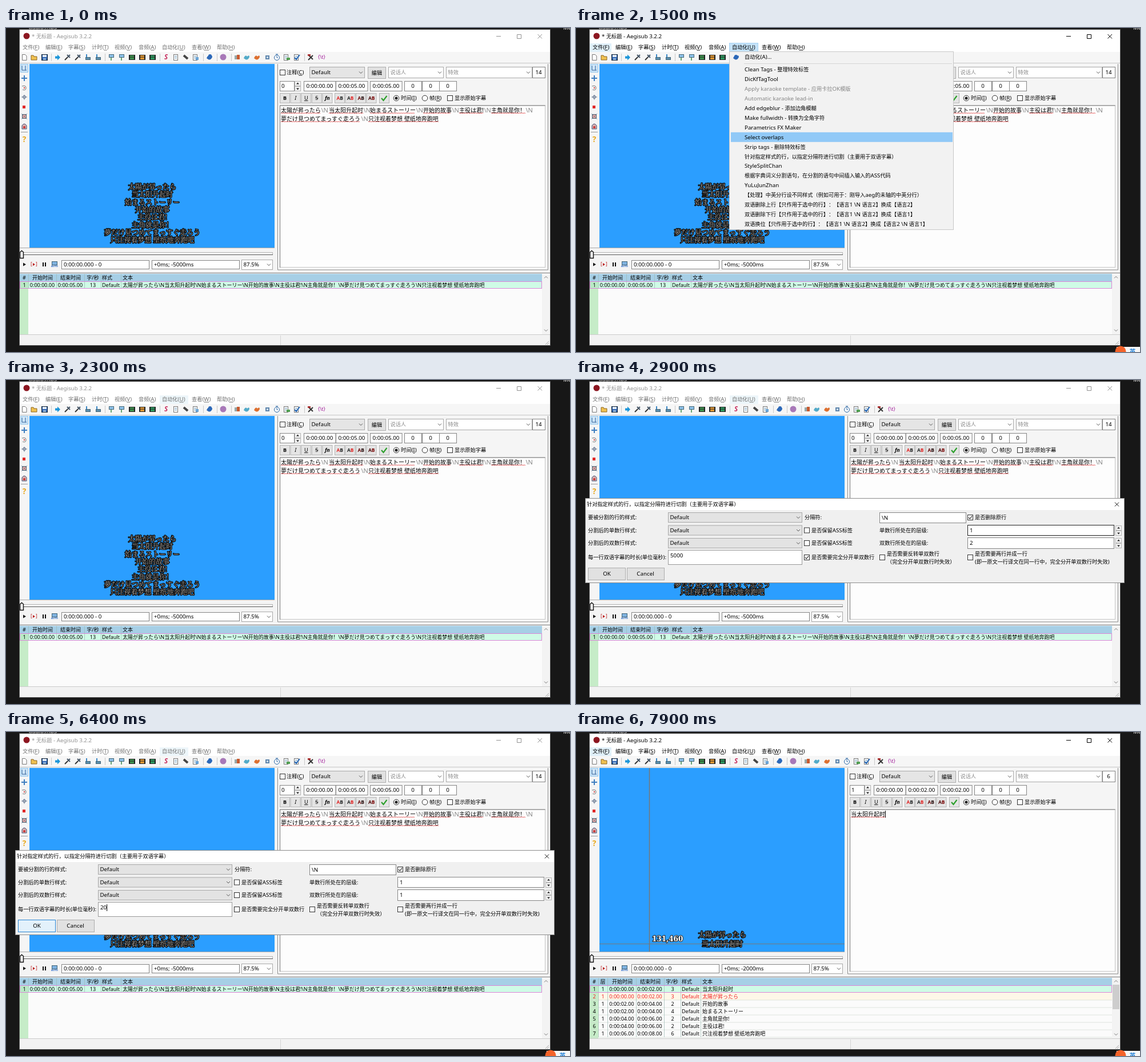
These frames come from a looping animation (987 by 568 pixels, 8 s). An HTML page:

```html
<!DOCTYPE html>
<html lang="zh-CN">
<head>
<meta charset="utf-8">
<style>
html, body { margin: 0; width: 100%; height: 100%; overflow: hidden; background: #171717; }
svg { display: block; width: 987px; height: 568px; }
text { white-space: pre; text-spacing-trim: space-all;
  font-family: "Noto Sans", "Noto Sans CJK SC", "Noto Sans CJK", sans-serif; }
.sub text { font-family: "Noto Serif CJK SC", "Noto Sans CJK SC", "Noto Sans CJK", serif;
  fill: #b9b4ae; stroke: #080808; stroke-width: 2.6px; paint-order: stroke; stroke-linejoin: round; }
.title { color: #929292; }
.bar { color: #707070; }
.active .title, .active .bar { color: #000; }
</style>
</head>
<body>
<svg id="stage" viewBox="0 0 987 568"></svg>
<script>
const CHANGE = 7600;
const stage = document.getElementById('stage');

// Drawing helpers; all return SVG markup.
const R = (x, y, w, h, fill = '#fff', stroke = 'none') => {
  const o = stroke === 'none' ? 0 : .5;
  return `<rect x="${x + o}" y="${y + o}" width="${w - 2 * o}" height="${h - 2 * o}" fill="${fill}" stroke="${stroke}"/>`;
};
const P = (d, stroke = '#333', w = 1, fill = 'none') =>
  `<path d="${d}" stroke="${stroke}" stroke-width="${w}" fill="${fill}"/>`;
const C = (x, y, r, fill, stroke = 'none') =>
  `<circle cx="${x}" cy="${y}" r="${r}" fill="${fill}" stroke="${stroke}"/>`;
// cy is the optical centre of the line; "&" underlines the next letter.
const T = (x, cy, str, { s = 9.2, f = '#000', a = 'start', k = 1.06, extra = '' } = {}) => {
  const body = str.replace(/&(\w)|[ -%'-~]+/g, (m, u) =>
    `<tspan font-size="${s * k}"${u ? ' text-decoration="underline"' : ''}>${u || m}</tspan>`);
  return `<text x="${x}" y="${cy + s * .37}" font-size="${s}" fill="${f}" text-anchor="${a}" ${extra}>${body}</text>`;
};
const mid = (x, cy, str, opt = {}) => T(x, cy, str, { a: 'middle', ...opt });
const G = (body, attrs = '') => `<g ${attrs}>${body}</g>`;
const during = (spans, body) => G(body, `data-t="${spans}"`);
const before = body => during(`0-${CHANGE}`, body);
const after = body => during(`${CHANGE}-8000`, body);
const each = (list, fn) => list.map(fn).join('');

const chevron = (x, y) => P(`M${x - 3} ${y - 1.5}l3 3l3-3`, '#555');
const combo = (x, y, w, str, { h = 20, bg = '#e5e5e5', f } = {}) =>
  R(x, y, w, h, bg, '#a8a8a8') + T(x + 3.5, y + h / 2, str, { f }) + chevron(x + w - 7, y + h / 2);
const field = (x, y, w, h, str = '') => R(x, y, w, h, '#fff', '#858585') + T(x + 4, y + h / 2, str);
const check = (x, cy, on, color = '#333') =>
  R(x, cy - 5, 10, 10, '#fff', color) + (on ? P(`M${x + 2} ${cy}l2.2 2.4l4-5`, color, 1.2) : '');
const spin = (x, y, h) => each([0, 1], i => {
  const top = y + i * h / 2, c = top + h / 4;
  return R(x, top, 11, h / 2, '#f4f4f4', '#b5b5b5') +
    P(i ? `M${x + 3} ${c - 1}h5l-2.5 3z` : `M${x + 3} ${c + 1}h5l-2.5-3z`, 'none', 0, '#222');
});
const squiggle = (x1, x2, y) => P(`M${x1} ${y}` + 'l1.5-1.5l1.5 1.5'.repeat((x2 - x1) / 3), '#e03030', .8);
const caret = (x, y, h = 12) => R(x, y, 1, h, '#000');

function titleBar() {
  const items = [[29, '文件(&F)'], [69, '编辑(&E)'], [109, '字幕(&S)'], [150, '计时(&T)'], [190, '视频(&V)'],
    [232, '音频(&A)'], [273, '自动化(&U)'], [325, '查看(&W)'], [369, '帮助(&H)']];
  return R(23, 2, 929, 40) +
    C(36, 14, 5.5, '#8c1620') +
    G(T(45, 14.5, '* 无标题 - Aegisub 3.2.2', { f: 'currentColor' }) +
      P('M858 14.5h8M894.5 11.5h7v7h-7zM930.5 11l7.5 7.5M938 11l-7.5 7.5', 'currentColor'), 'class="title"') +
    during('500-2200 7700-8000', R(24, 27, 38, 15, '#e0f0fa')) +
    during('800-900', R(146, 27, 40, 15, '#d4eafb')) +
    during('900-1000', R(228, 27, 40, 15, '#d4eafb')) +
    during('1000-1900', R(268, 26, 51, 16, '#c5e3f9', '#a4d1f3')) +
    during(`1900-${CHANGE}`, R(269, 27, 50, 15, '#edf6fa')) +
    G(each(items, ([x, s]) => T(x, 34, s, { f: 'currentColor' })), 'class="bar"');
}

function toolbar() {
  const y = 51;
  const lens = x => P(`M${x - 5} ${y + 5}l5-5`, '#333', 2) + P(`M${x - 1} ${y - 4}l5 5M${x} ${y}l4-4`, '#456', 2);
  const disk = x => R(x - 4, y, 9, 5, '#5b8fae', '#467') + P(`M${x - 2} ${y - 5}v5`, '#3a87c8', 2);
  const flag = x => R(x - 4, y - 5, 9, 6, '#8cc0e8', '#467') + P(`M${x} ${y + 1}v5`, '#3a8a4a', 1.5);
  const film = (x, c) => R(x - 5, y - 4, 11, 9, '#222') + R(x - 3, y - 3, 7, 7, c) + P(`M${x - 5} ${y}h11`, '#222');
  const page = x => R(x - 4, y - 5, 8, 11, '#fff', '#777') + P(`M${x - 2} ${y - 1.5}h4M${x - 2} ${y + 1.5}h4`, '#69b');
  const blob = (x, c) => P(`M${x - 5} ${y + 2}q3-7 6-3q4-4 4 1q-3 6-7 4z`, 'none', 0, c);
  return R(23, 42, 929, 21, '#f6f6f6') + P('M23 61.5h929', '#c4c4c4') +
    P('M28.5 46.5h5l2.5 2.5v7.5h-7.5z', '#777', 1, '#fff') +
    P('M44 56v-8h4l1 2h5v6z', '#8a6420', 1, '#f0c050') +
    R(62, 46, 11, 11, '#2d62b0', '#123') + R(64, 47, 7, 4, '#dfe9f5') + R(65, 53, 5, 3, '#9bd') +
    P('M86 49.5h4v-3l5 5l-5 5v-3h-4z', 'none', 0, '#1d96d8') +
    lens(108) + lens(126) + disk(143) + disk(161) + flag(184) + flag(202) +
    film(220, '#3f9650') + film(238, '#e69a35') + film(256, '#2c9a60') +
    mid(280, y, 'S', { s: 11, f: '#c83060', extra: 'font-weight="700" font-style="italic"' }) +
    page(297) + P('M311 48l7 6', '#444', 4) + page(331) + R(332, 51, 5, 5, '#6ba5d8') +
    blob(356, '#2c68b8') + C(357, 49, 3, '#2c68b8') + C(380, 51, 5.5, '#a878b8') +
    R(400, 48, 4, 7, '#9aa') + R(404, 47, 5, 8, '#c85a30') +
    blob(421, '#52aac8') + blob(439, '#dd7030') + R(454, 48, 7, 7, '#6288ae') + R(456, 50, 3, 3, '#cde') +
    C(474, 52, 4.5, '#fff', '#2360a0') + P('M474 52v-3M474 52h2M472 46h4', '#2360a0') +
    page(490) + R(491, 52, 6, 4, '#50a050') + page(508) + P('M505 52l3 3l6-8', '#2768b8', 2) +
    P('M529 56l8-8M530 48l7 7', '#333', 2) + R(528, 46, 5, 3, '#a33') +
    T(546, y, '{\\t}', { s: 8, f: '#a01898' }) +
    each([79, 173, 269, 345, 369, 394, 522], x => P(`M${x}.5 45v13`, '#c8c8c8'));
}

function sideTools() {
  return R(24, 63, 17, 322, '#f5f5f5') + R(25, 63, 14, 15, '#cfe6f8', '#8fc4ea') +
    P('M28 66v8h8M34 66v8', '#2a5d96') +
    P('M27 88h10M32 83v10', '#3d7dc0', 2) +
    P('M28 102q7-2 7 3t-6 3', '#888', 1.2) + R(31, 104, 2, 2, '#c33') +
    P('M27 121h10M32 117v9', '#789') + C(32, 121, 2.5, 'none', '#568') +
    R(29, 136, 5, 5, '#e02828') +
    R(28, 151, 8, 8, '#e8a8a0', '#467') + P('M27 150l10 10M37 150l-10 10', '#568', .6) +
    P('M28 177v-6q4-6 8 0v6z', '#457', 1, '#d8b0b0') + C(32, 174, 2, '#c33') +
    P('M26 182.5h12', '#999') +
    mid(32, 195, '?', { s: 13, f: '#e9a81c', extra: 'font-weight="700"' });
}

function video() {
  const lines = ['太陽が昇ったら', '当太阳升起时', '始まるストーリー', '开始的故事', '主役は君!', '主角就是你！',
    '夢だけ見つめてまっすぐ走ろう', '只注视着梦想 壁纸地奔跑吧'];
  const sub = (s, y) => mid(256, y, s, { s: 12, k: 1 });
  return R(41, 63, 429, 322, '#2b9eff') +
    before(G(each(lines, (s, i) => sub(s, 278.5 + i * 13.35)), 'class="sub"')) +
    after(G(sub(lines[0], 355.5) + sub(lines[1], 371.5), 'class="sub"')) +
    during('7700-8000', P('M128.5 63v322', '#777', 1.5) + P('M41 371.5h429', '#777', 1) +
      `<text x="133" y="367" font-size="12" fill="#fff" stroke="#222" stroke-width="2" paint-order="stroke"
        style="font-family:'DejaVu Serif',serif;font-weight:700">131,460</text>`) +
    P('M24 385.5h446', '#aaa') + R(30, 393, 437, 5, '#fafafa', '#b4b4b4') + P('M30 397.5h437', '#555') +
    P('M24.5 393l3-2.5l3 2.5v10.5h-6z', '#111', 1.4, '#eee') +
    P('M30 411.5v6l5-3z', 'none', 0, '#111') +
    T(43, 414.5, '[', { s: 8, f: '#b22' }) + P('M47 412v5l4-2.5z', 'none', 0, '#b22') + T(52, 414.5, ']', { s: 8, f: '#b22' }) +
    R(64, 411, 2, 7, '#111') + R(68, 411, 2, 7, '#111') +
    R(80, 409, 10, 7, '#7fb2e0', '#467') + mid(85, 418, 'AUTO', { s: 4, f: '#1c5fc0', extra: 'font-weight="700"' }) +
    field(97, 407, 154, 16, '0:00:00.000 - 0') + field(255, 407, 154, 16) +
    before(T(259, 415, '+0ms; -5000ms')) + after(T(259, 415, '+0ms; -2000ms')) +
    combo(412, 406, 55, '87.5%', { h: 18, bg: '#fff' });
}

function editor() {
  const times = end => each([[521, '0:00:00.00'], [577, end], [637, end]], ([x, s]) => field(x, 93, 56.5, 18) + mid(x + 28, 102, s));
  const style = ['font-weight="800"', 'font-style="italic"', 'text-decoration="underline"', 'text-decoration="line-through"',
    'font-weight="800" font-style="italic"'];
  const colors = [['#e02020', '#222'], ['#222', '#e02020'], ['#600', '#200'], ['#400', '#700']];
  const button = (x, w = 18) => R(x, 114, w, 18, '#e4e4e4', '#b4b4b4');
  const words = [[481, '太陽が昇ったら', 551], [565, '当太阳升起时', 625], [637, '始まるストーリー', 717], [730, '开始的故事', 780],
    [793, '主役は君!', 836], [849, '主角就是你！', 909]];
  const edit = { s: 10, k: 1.1 }, gray = { ...edit, f: '#888' };
  const word = ([x, s, end], y) => T(x, y, s, edit) + squiggle(x, end, y + 6);
  return R(475, 63, 477, 366, '#f5f5f5') + P('M475.5 63v361h473v-361', '#8a8a8a') + P('M477 63v359h470', '#fff') +
    check(479, 78, false) + T(491, 78, '注释(&C)') +
    combo(531, 68, 97, 'Default') + R(633, 68, 32, 21, '#e1e1e1', '#adadad') + mid(649, 78.5, '编辑') +
    combo(669, 68, 97, '说话人', { bg: '#fff', f: '#888' }) + combo(770, 68, 151, '特效', { bg: '#fff', f: '#888' }) +
    R(921, 68, 23, 20, '#fff', '#858585') + before(mid(932, 78, '14')) + after(mid(932, 78, '6')) +
    field(479, 93, 26, 18) + spin(505, 93, 18) +
    before(T(482, 102, '0') + times('0:00:05.00')) + after(T(482, 102, '1') + times('0:00:02.00')) +
    each([697, 728, 758], x => field(x, 93, 31, 18) + mid(x + 15, 102, '0')) +
    each(['B', 'I', 'U', 'S', 'fn'], (s, i) => button(479 + i * 18.6) + mid(488 + i * 18.6, 123, s, { s: 8.5, extra: style[i] })) +
    each(colors, ([a, b], i) => button(575 + i * 18.5) +
      mid(581.5 + i * 18.5, 123, 'A', { s: 8, f: a, extra: 'font-weight="800"' }) +
      mid(587 + i * 18.5, 123, 'B', { s: 8, f: b, extra: 'font-weight="800"' })) +
    button(653) + P('M657 123l3.5 4l6-8', '#2da02d', 2.2) +
    C(683, 123, 4.8, '#fff', '#333') + C(683, 123, 2.6, '#222') + T(691, 123, '时间(&I)') +
    C(733, 123, 4.8, '#fff', '#333') + T(741, 123, '帧(&R)') +
    check(772, 123, false) + T(785, 123, '显示原始字幕') +
    R(479, 135, 465, 285, '#fdfdfd', '#c8c8c8') + P('M479.5 420v-284h464', '#777') +
    before(each(words, w => word(w, 144) + T(w[2] + .5, 144, '\\N', gray)) +
      word([481, '夢だけ見つめてまっすぐ走ろう', 621], 159) + T(621.5, 159, '\\N', gray) +
      word([634, '只注视着梦想 壁纸地奔跑吧', 757], 159)) +
    after(word([481, words[1][1], 541], 144) + caret(541, 138));
}

function grid() {
  const g = { s: 9, k: 1 };
  const head = list => each(list, ([x, s]) => mid(x, 437.5, s, g));
  const vlines = (xs, bottom) => each(xs, x => P(`M${x}.5 431v${bottom - 431}`, '#9db9b4', .7));
  const rows = [['00', '02', 3, '当太阳升起时'], ['00', '02', 3, '太陽が昇ったら'], ['02', '04', 2, '开始的故事'],
    ['02', '04', 4, '始まるストーリー'], ['04', '06', 2, '主角就是你!'], ['04', '06', 2, '主役は君!'], ['06', '08', 6, '只注视着梦想 壁纸地奔跑吧']];
  const row = ([a, b, cps, s], i) => {
    const y = 450.3 + i * 13.05, o = { ...g, f: i === 1 ? '#f02020' : '#000' };
    return (i === 1 ? R(39, 457, 899, 13, '#fdf7e8') : '') + P(`M24 ${y + 6.6}h914`, '#d2d9d2', .7) +
      mid(32, y, `${i + 1}`, o) + mid(47, y, '1', o) + mid(80, y, `0:00:${a}.00`, o) + mid(129, y, `0:00:${b}.00`, o) +
      mid(169, y, `${cps}`, o) + T(185, y, 'Default', o) + T(221, y, s, o);
  };
  const full = '太陽が昇ったら\\N当太阳升起时\\N始まるストーリー\\N开始的故事\\N主役は君!\\N主角就是你！\\N夢だけ見つめてまっすぐ走ろう\\N只注视着梦想 壁纸地奔跑吧';
  return R(23, 429, 929, 109, '#fbfbfb') + P('M23 429.5h929', '#777') +
    R(24, 431, 914, 13, '#a6cfe6') + R(24, 444, 15, 93, '#c6ecc8') +
    R(24, 444, 914, 13, '#cffbe6') + R(24, 444, 15, 13, '#b9eac6') +
    before(head([[32, '#'], [64, '开始时间'], [113, '结束时间'], [152, '字/秒'], [177, '样式'], [213, '文本']]) +
      vlines([39, 88, 137, 166, 201], 457) +
      mid(32, 450.3, '1', g) + mid(63.5, 450.3, '0:00:00.00', g) + mid(112.5, 450.3, '0:00:05.00', g) +
      mid(152, 450.3, '13', g) + T(168, 450.3, 'Default', g) + T(204, 450.3, full, g)) +
    after(each(rows, row) + vlines([39, 55, 105, 154, 183, 218], 535) +
      head([[32, '#'], [47, '层'], [81, '开始时间'], [130, '结束时间'], [168, '字/秒'], [194, '样式'], [230, '文本']])) +
    R(24, 444, 914, 13, 'none', '#dc86d8') +
    R(938, 431, 13, 106, '#f3f3f3') + P('M942 438.5l3-3l3 3M942 528.5l3 3l3-3', '#777') +
    after(R(939, 443, 12, 43, '#cdcdcd')) +
    R(23, 537, 929, 20, '#f2f2f2') + P('M23 537.5h929', '#ccc') + P('M480.5 539v17', '#d4d4d4') +
    P('M944 555l6-6M947 555l3-3', '#aaa');
}

function menu() {
  const items = ['Clean Tags - 整理特效标签', 'DicKfTagTool', 'Apply karaoke template - 应用卡拉OK模版', 'Automatic karaoke lead-in',
    'Add edgeblur - 添加边角模糊', 'Make fullwidth - 转换为全角字符', 'Parametrics FX Maker', 'Select overlaps', 'Strip tags - 删除特效标签',
    '针对指定样式的行，以指定分隔符进行切割（主要用于双语字幕）', 'StyleSplitChan', '根据字典词义分割语句，在分割的语句中间插入输入的ASS代码',
    'YuLuJunZhan', '【处理】中英分行设不同样式（例如可用于：刚导入aeg的未轴的中英分行）',
    '双语删除上行【只作用于选中的行】：【语言1 \\N 语言2】换成【语言2】', '双语删除下行【只作用于选中的行】：【语言1 \\N 语言2】换成【语言1】',
    '双语换位【只作用于选中的行】：【语言1 \\N 语言2】换成【语言2 \\N 语言1】'];
  const rowY = i => 73 + i * 16.9;
  const hover = (span, i) => during(span, R(271, rowY(i) - 8.5, 388, 17, '#91c9f7'));
  return G(R(268, 41, 393, 313, '#f2f2f2', '#c8c8c8') +
    hover('1400-1500', 3) + hover('1500-1600', 7) + hover('1600-1700', 8) + hover('1700-2400', 9) +
    C(280, 50, 3, '#2c68b8') + P('M275 53q3-7 6-3q4-4 4 1q-3 6-7 4z', 'none', 0, '#2c68b8') +
    T(295, 51, '自动化(A)...') + P('M294 62.5h364', '#d5d5d5') +
    each(items, (s, i) => T(295, rowY(i), s, { f: i === 2 || i === 3 ? '#858585' : '#000' })), 'id="menu"');
}

function dialog() {
  const ys = [241, 263.5, 286, 311];
  const left = ['要被分割的行的样式:', '分割后的单数行样式:', '分割后的双数行样式:', '每一行双语字幕的时长(单位毫秒):'];
  const typed = (span, s) => during(span, T(165, 307.5, s));
  const caretAt = (span, n) => during(span, caret(165 + n * 5.58, 302));
  const blue = '#2a86d4';
  return G(R(16, 207, 944, 149, '#f0f0f0', '#8c8c8c') + R(17, 208, 942, 20) +
    T(19, 217.5, '针对指定样式的行，以指定分隔符进行切割（主要用于双语字幕）') + P('M943 214.5l7 7M950 214.5l-7 7', '#111') +
    each(left, (s, i) => T(21, ys[i], s)) +
    each([0, 1, 2], i => combo(161, ys[i] - 9, 235, 'Default', { h: 18, bg: '#e3e3e3' })) +
    R(161, 298, 235, 26, '#fff', '#999') +
    during('5100-5900', R(161, 298, 235, 26, 'none', blue)) +
    during('5300-5900', R(164, 301, 24, 13, '#0078d7') + T(165, 307.5, '5000', { f: '#fff' })) +
    typed('0-5300', '5000') + typed('6200-6300', '2') + typed('6300-6600', '20') + typed('6600-6700', '200') + typed('6700-8000', '2000') +
    caretAt('5900-6200', 0) + caretAt('6200-6300', 1) + caretAt('6300-6600', 2) + caretAt('6600-6700', 3) + caretAt('6700-7100', 4) +
    T(400, ys[0], '分隔符:') +
    each([1, 2], i => check(399, ys[i], false) + T(412, ys[i], '是否保留ASS标签')) +
    during('4300-4400', check(399, ys[2], false, blue)) +
    during('0-4400', check(399, 311, true)) + during('4400-4800', check(399, 311, true, blue)) +
    during('4800-5100', check(399, 311, false, blue)) + during('5100-8000', check(399, 311, false)) +
    T(412, 311, '是否需要完全分开单双数行') +
    field(531, 232, 152, 19, '\\N') + T(531, ys[1], '单数行所处在的层级:') + T(531, ys[2], '双数行所处在的层级:') +
    check(531, 311, false) + during('4200-4300', check(531, 311, false, blue)) +
    T(544, 305, '是否需要反转单双数行') + T(544, 318.5, '（完全分开单双数行时失效）') +
    check(685, 241, true) + T(698, 241, '是否删除原行') +
    field(685, 254, 257, 19, '1') + spin(944, 255, 18) + during('2600-3400', R(685, 254, 257, 19, 'none', '#222')) +
    field(685, 276, 257, 20) + spin(944, 277, 18) +
    during('3500-3700', R(944, 286, 11, 9, '#cfe7fa', blue) + P('M947 289.5h5l-2.5 3z', 'none', 0, '#222')) +
    during('0-3600', T(689, 286, '2')) + during('3600-8000', T(689, 286, '1')) +
    during('3500-4800', R(685, 276, 257, 20, 'none', blue)) +
    check(685, 311, false) + during('4000-4100', check(685, 311, false, blue)) +
    T(698, 305, '是否需要两行并成一行') + T(698, 318.5, '(即一原文一行译文在同一行中，完全分开单双数行时失效)') +
    R(21, 329, 66, 22, '#e1e1e1', '#adadad') + R(89, 329, 66, 22, '#e1e1e1', '#adadad') +
    during('6100-7300', R(21, 329, 66, 22, '#e3f1fb', blue)) + during('7300-8000', R(21, 329, 66, 22, '#cce4f7', '#1565a8')) +
    mid(54, 340, 'OK') + mid(121.5, 340, 'Cancel'), 'id="dialog"');
}

stage.innerHTML = R(0, 0, 987, 568, '#171717') +
  T(40, -1.5, 'audio.mp3', { f: '#ddd' }) + T(975, 0, 'Me', { f: '#ddd' }) +
  R(23, 2, 929, 555, '#f4f4f4') +
  titleBar() + toolbar() + sideTools() + video() + editor() + grid() +
  R(23, 2, 930, 555, 'none', '#555') + menu() + dialog() +
  during('400-2300 3400-4800 5200-8000', R(946, 559, 41, 9, '#f6f6f6') + C(953, 567, 9.5, '#f4632a') +
    mid(974, 567.5, '英', { s: 11, f: '#2080d8', extra: 'font-weight="700"' }));

const timed = [...stage.querySelectorAll('[data-t]')].map(el =>
  [el, el.dataset.t.split(' ').map(s => s.split('-').map(Number))]);
const within = (t, spans) => spans.some(([a, b]) => t >= a && t < b);

// Opacity ramps up over [a, b] and down over [c, d].
const fade = (t, a, b, c, d) => Math.max(0, Math.min(1, (t - a) / (b - a), (d - t) / (d - c)));
const setOpacity = (id, v) => {
  const el = document.getElementById(id);
  el.style.opacity = v;
  el.style.display = v ? '' : 'none';
};

const start = performance.now();
function draw() {
  const ms = (performance.now() - start) % 8000;
  const t = Math.floor(ms / 100) * 100;
  for (const [el, spans] of timed) el.style.display = within(t, spans) ? '' : 'none';
  stage.classList.toggle('active', within(t, [[400, 2200], [7500, 8000]]));
  setOpacity('menu', fade(t, 930, 1280, 2000, 2300));
  setOpacity('dialog', fade(t, 2500, 2800, 7300, 7500));
  requestAnimationFrame(draw);
}
draw();
</script>
</body>
</html>
```
